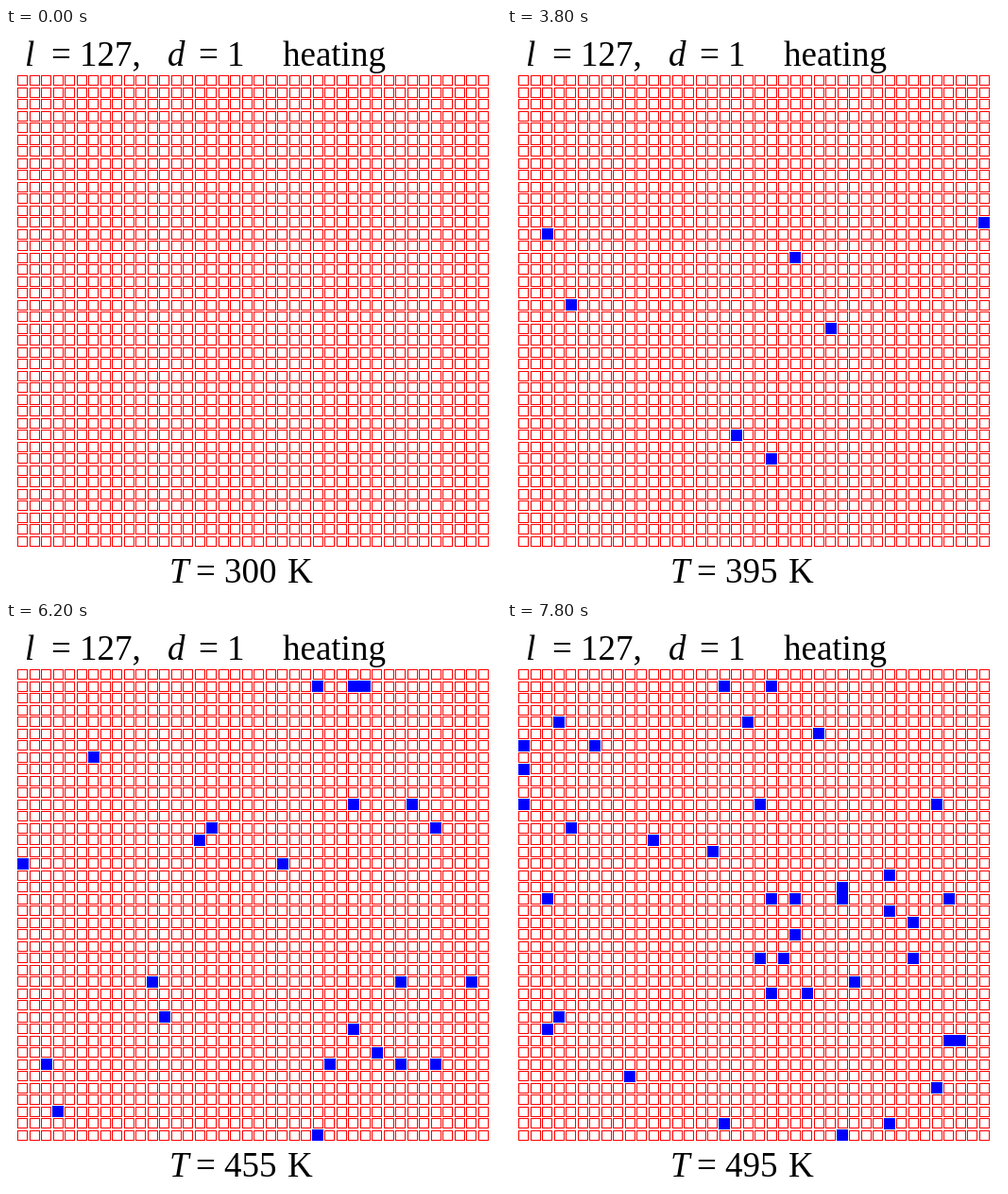
These frames come from a looping animation (524 px wide and 599 px high, 8 s). An HTML page with a canvas:

```html
<!DOCTYPE html>
<html lang="en">
<head>
<meta charset="utf-8">
<title>Lattice heating</title>
<style>
  html, body { margin: 0; width: 100%; height: 100%; overflow: hidden; background: #fff; }
  canvas { display: block; }
</style>
</head>
<body>
<canvas id="stage" width="524" height="599"></canvas>
<script>
const ctx = document.getElementById('stage').getContext('2d');
const SIZE = 40, PITCH = 12.5, LEFT = 12, TOP = 50;
const STEP_MS = 200, STEPS = 40, START_K = 300, STEP_K = 5;
const MAX_EXCITED = 40, GROWTH = 2.5;

// Small seeded generator with well-mixed output for neighbouring seeds.
function seeded(seed) {
  return () => {
    seed = (seed + 0x6D2B79F5) | 0;
    let mix = Math.imul(seed ^ (seed >>> 15), seed | 1);
    mix ^= mix + Math.imul(mix ^ (mix >>> 7), mix | 61);
    return ((mix ^ (mix >>> 14)) >>> 0) / 4294967296;
  };
}

function drawLattice() {
  ctx.strokeStyle = '#f00';
  ctx.lineWidth = 1;
  for (let row = 0; row < SIZE; row++) {
    for (let col = 0; col < SIZE; col++) {
      ctx.strokeRect(Math.ceil(LEFT + col * PITCH) + 0.5,
                     Math.ceil(TOP + row * PITCH) + 0.5, 10, 10);
    }
  }
}

// Every step excites a fresh random set of cells, growing with temperature.
function drawExcited(step) {
  const random = seeded(step);
  const pick = () => Math.floor(random() * SIZE);
  const count = Math.round(MAX_EXCITED * (step / (STEPS - 1)) ** GROWTH);
  ctx.fillStyle = '#00f';
  for (let i = 0; i < count; i++) {
    ctx.fillRect(Math.floor(LEFT + pick() * PITCH), Math.floor(TOP + pick() * PITCH), 12, 12);
  }
}

function label(text, x, y, style = 'normal') {
  ctx.font = `${style} 37px "Liberation Serif", "Times New Roman", serif`;
  ctx.fillStyle = '#000';
  ctx.fillText(text, x, y);
}

function draw(step) {
  ctx.fillStyle = '#fff';
  ctx.fillRect(0, 0, 524, 599);
  label('l', 20, 40, 'italic');
  label('= 127,', 48, 40);
  label('d', 171, 40, 'italic');
  label('= 1', 204, 40);
  label('heating', 293, 40);
  drawLattice();
  drawExcited(step);
  label('T', 173, 587, 'italic');
  label(`= ${START_K + step * STEP_K}`, 201, 587);
  label('K', 298, 587);
}

let shown = -1;
const start = performance.now();
function tick() {
  const step = Math.floor((performance.now() - start) / STEP_MS) % STEPS;
  if (step !== shown) draw(shown = step);
  requestAnimationFrame(tick);
}
tick();
</script>
</body>
</html>
```
